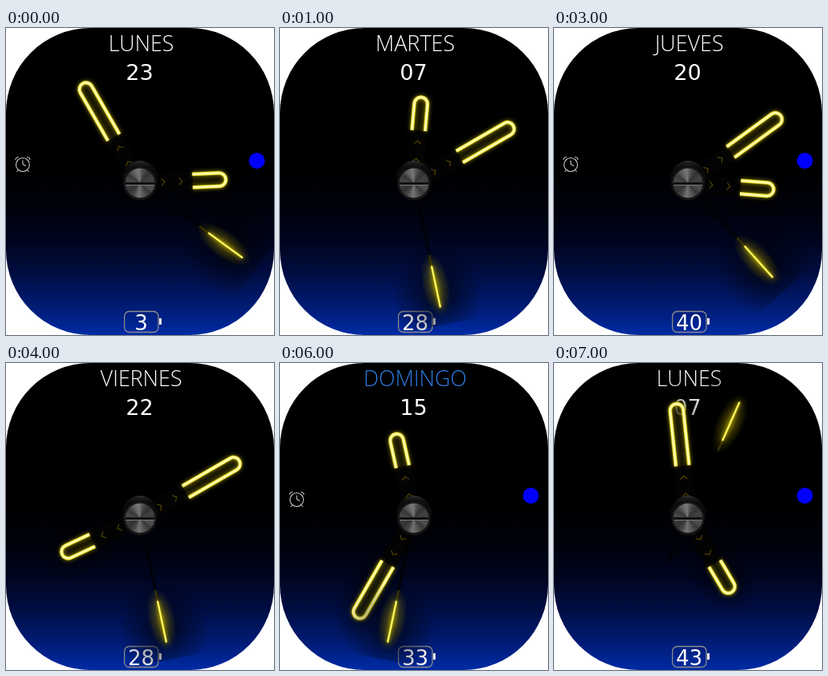
Write an HTML page with a canvas that moves like this. It is 336 px wide and 384 px high and loops after 8000 ms.

```html
<!DOCTYPE html>
<html lang="es">
<head>
<meta charset="utf-8">
<style>
  html, body { margin: 0; width: 100%; height: 100%; overflow: hidden; background: #fff; }
  canvas { display: block; }
</style>
</head>
<body>
<canvas id="stage" width="336" height="384"></canvas>
<script>
const ctx = document.getElementById('stage').getContext('2d');
const CX = 168, CY = 194, TAU = Math.PI * 2;

// One watch state per second
const states = [
  { day: 'LUNES',     date: '23', level: 3,  time: [2, 55, 21],  alarm: true,  radio: true },
  { day: 'MARTES',    date: '07', level: 28, time: [12, 10, 28], alarm: false, radio: false },
  { day: 'MIERCOLES', date: '15', level: 33, time: [10, 36, 44], alarm: true,  radio: false },
  { day: 'JUEVES',    date: '20', level: 40, time: [3, 9, 23],   alarm: true,  radio: true },
  { day: 'VIERNES',   date: '22', level: 28, time: [8, 10, 28],  alarm: false, radio: false },
  { day: 'SABADO',    date: '24', level: 14, time: [3, 37, 44],  alarm: false, radio: false },
  { day: 'DOMINGO',   date: '15', level: 33, time: [11, 35, 32], alarm: true,  radio: true },
  { day: 'LUNES',     date: '07', level: 43, time: [4, 59, 4],   alarm: false, radio: true },
];

function addStops(g, stops) {
  stops.forEach(([at, color]) => g.addColorStop(at, color));
  return g;
}

const vertical = (y0, y1, ...stops) => addStops(ctx.createLinearGradient(0, y0, 0, y1), stops);

function disc(x, y, r, fill) {
  ctx.beginPath();
  ctx.arc(x, y, r, 0, TAU);
  ctx.fillStyle = fill;
  ctx.fill();
}

// Soft elliptical spot that fades to nothing at its rim
function spot(y, rx, ry, rgb, alpha) {
  ctx.save();
  ctx.translate(0, y);
  ctx.scale(rx, ry);
  disc(0, 0, 1, addStops(ctx.createRadialGradient(0, 0, 0, 0, 0, 1), [
    [0, `rgba(${rgb},${alpha})`], [.5, `rgba(${rgb},${alpha * .45})`], [1, `rgba(${rgb},0)`]]));
  ctx.restore();
}

function stroke(path, color, width, glow = 0) {
  ctx.save();
  ctx.strokeStyle = color;
  ctx.lineWidth = width;
  ctx.shadowColor = color;
  ctx.shadowBlur = glow;
  ctx.stroke(new Path2D(path));
  ctx.restore();
}

function label(text, x, y, font, color = '#fff') {
  ctx.font = font;
  ctx.fillStyle = color;
  ctx.textAlign = 'center';
  ctx.fillText(text, x, y);
}

// Draws with the hand's axis pointing up from the dial centre
function rotated(degrees, draw) {
  ctx.save();
  ctx.translate(CX, CY);
  ctx.rotate(degrees * Math.PI / 180);
  draw();
  ctx.restore();
}

function loopHand(degrees, tip) {
  rotated(degrees, () => {
    const half = 8.3, bend = tip - half - 2.3;
    const loop = `M${-half} -66V${-bend}A${half} ${half} 0 0 1 ${half} ${-bend}V-66`;
    spot(-tip * .75, 36, tip * .5, '0,0,0', .7);
    ctx.fillStyle = '#030303';
    ctx.fillRect(-11, -66, 22, 66);
    ctx.fillStyle = '#2c28008c';
    ctx.fill(new Path2D(loop));
    stroke(loop, '#8f8300', 5, 5);
    stroke(loop, '#f2e63a', 4.2);
    stroke(loop, '#fffcb4', 2.4);
    for (const r of [31, 53]) stroke(`M-4.5 ${4 - r}L0 ${-r}L4.5 ${4 - r}`, '#4a3d04', 1.4);
  });
}

function secondHand(degrees) {
  rotated(degrees, () => {
    ctx.save();
    ctx.beginPath();
    ctx.rect(-60, -181, 120, 181);
    ctx.clip();
    spot(-145, 58, 62, '0,0,0', .75);
    ctx.restore();
    ctx.fillStyle = '#0009';
    ctx.fillRect(-2, -106, 4, 166);
    spot(-130, 17, 40, '170,155,0', .6);
    stroke('M0 -92V-107', '#63580077', 2.5);
    stroke('M0 -106V-159', '#d8c800', 2.6, 5);
    stroke('M0 -106V-159', '#fffa80', 1.7);
  });
}

function cap() {
  disc(CX, 188, 22, vertical(166, 210, [0, '#383838'], [.06, '#1c1c1c'], [.2, '#0c0c0c'], [1, '#050505']));
  disc(CX, 194.5, 21, '#141414');
  const tones = [60, 80, 55, 85, 115, 70, 50, 60, 70, 55, 95, 120, 70, 50, 65, 60];
  const metal = ctx.createConicGradient(0, CX, 194);
  disc(CX, 194, 18.5, addStops(metal, tones.map((v, i) => [i / (tones.length - 1), `rgb(${v},${v},${v})`])));
  stroke('M149.500 194.5H186.500', '#111', 3);
  stroke('M150 196.5H186', '#777', 1);
}

function alarmIcon() {
  stroke('M29.5 171a8.5 8.5 0 1 1-17 0a8.5 8.5 0 1 1 17 0M21 165.5V170.500L25 172.500', '#ccc', 1.1);
  stroke('M12 165Q12 161.5 16 161.5M26 161.5Q30 161.5 30 165M15 178L13.5 180M27 178L28.5 180', '#bbb', 1.1);
}

function battery(level) {
  ctx.beginPath();
  ctx.roundRect(148.5, 354.5, 42.5, 26, 6);
  ctx.strokeStyle = '#8c8c8c';
  ctx.lineWidth = 1.3;
  ctx.stroke();
  ctx.fillStyle = '#eee';
  ctx.fillRect(192, 363, 3, 8);
  label(level, 169.5, 378, '26px "DejaVu Sans", sans-serif');
}

function draw({ day, date, level, time: [h, m, s], alarm, radio }) {
  ctx.clearRect(0, 0, 336, 384);
  ctx.save();
  ctx.beginPath();
  ctx.roundRect(0, 0, 336, 384, 106);
  ctx.clip();
  ctx.fillStyle = vertical(0, 384, [0, '#000'], [.46, '#000'], [.6, '#00020c'],
    [.7, '#00051f'], [.8, '#000d42'], [.9, '#001a70'], [1, '#002ba4']);
  ctx.fillRect(0, 0, 336, 384);

  const weekend = day === 'SABADO' || day === 'DOMINGO';
  label(day, 169.5, 28.5, '300 27px "Open Sans", sans-serif', weekend ? '#2c7be0' : '#fff');
  label(date, 167.5, 65, '27px "DejaVu Sans", sans-serif');
  if (alarm) alarmIcon();
  if (radio) disc(314.5, 166, 10, '#00f');
  battery(level);

  loopHand(h * 30 + m / 2, 110);
  loopHand(m * 6, 146);
  secondHand(s * 6);
  cap();
  ctx.restore();
}

function tick(now) {
  draw(states[Math.floor(now / 1000) % states.length]);
  requestAnimationFrame(tick);
}
tick(0);
</script>
</body>
</html>
```
